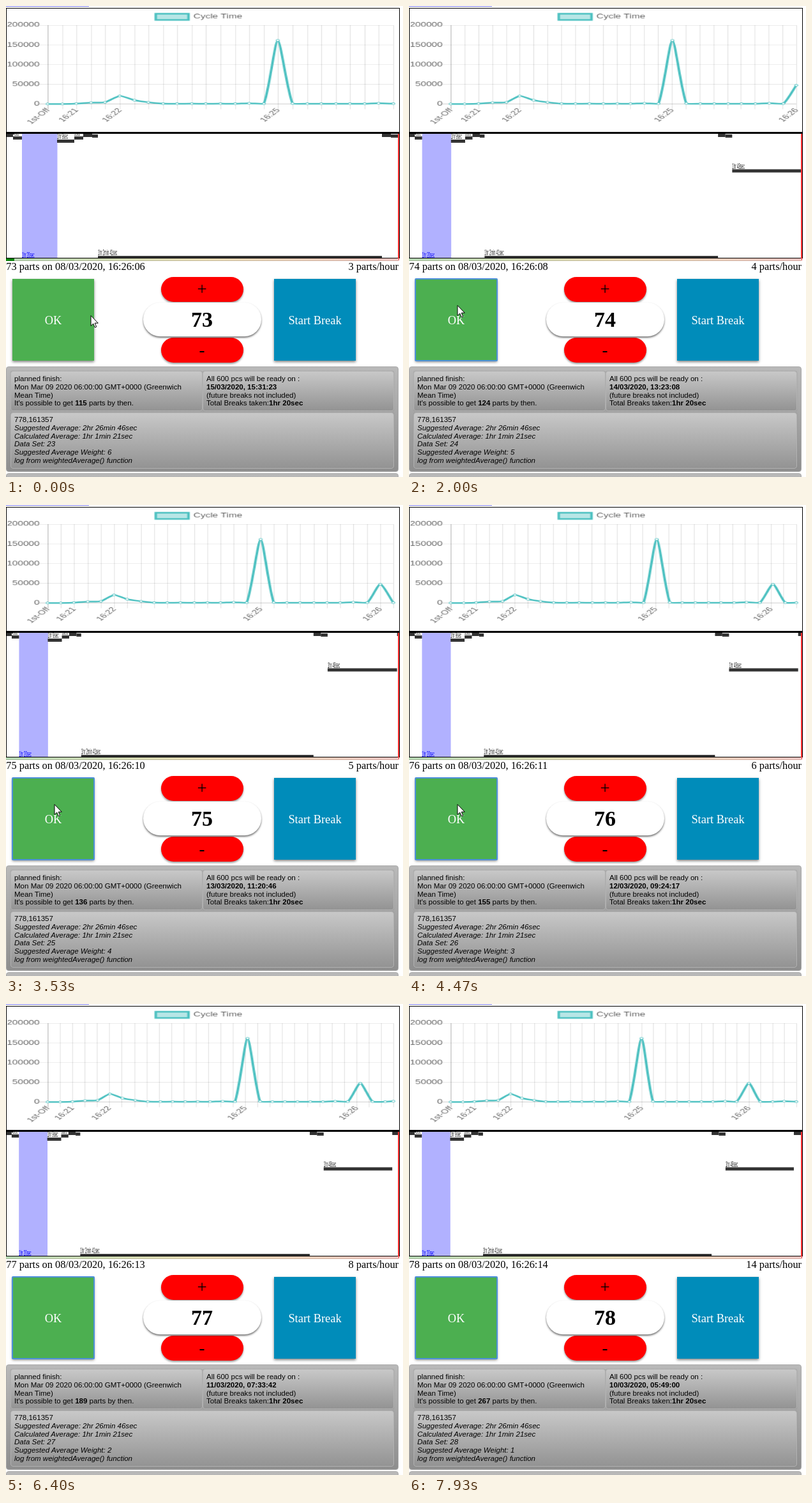
These frames come from a looping animation (622x737 px, 8000 ms). An HTML page with a canvas:

```html
<!DOCTYPE html>
<html lang="en">
<head>
<meta charset="utf-8">
<title>Cycle time</title>
<style>
  html, body { margin: 0; width: 622px; height: 737px; overflow: hidden; background: #fff; }
  body { position: relative; }
  div, canvas, svg { position: absolute; box-sizing: border-box; }
  svg { left: 0; top: 0; }
  #chart { left: 1px; top: 4px; width: 616px; height: 193.5px; }
  .frame { left: 0; width: 617px; border: 1px solid #000; }
  .tile { top: 427px; width: 128px; height: 128px; box-shadow: 0 2px 4px rgba(0,0,0,.5); }
  .pill { left: 243px; width: 128.5px; height: 39px; border-radius: 19.5px; background: #f00; box-shadow: 0 2px 3px rgba(0,0,0,.4); }
  .count { left: 215px; top: 463.5px; width: 185px; height: 53px; border-radius: 26.5px; background: #fff; box-shadow: 0 2px 3px rgba(0,0,0,.55); }
  .panel { left: 0; width: 614.5px; border-radius: 4px; background: linear-gradient(#b9b9b9, #8e8e8e); border: 1px solid #a9a9a9; }
  .card { border-radius: 4px; background: linear-gradient(#c8c8c8, #939393); border: 1.5px solid #b2b2b2; box-shadow: 0 0 1px #777; }
  .bar { left: 0; top: 395px; width: 615px; height: 4px; background: linear-gradient(90deg, #b5d8b3, #e8dcb4 50%, #f6c5c2); border-bottom: 1px solid rgba(120,110,90,.25); }
  #spent { left: 0; top: 395px; width: 13px; height: 4px; background: #0a820a; }
  #focus { left: 9px; top: 426px; width: 130px; height: 130px; border: 2px solid #4d90d9; border-radius: 2px; }
  #touch { left: 53px; top: 465px; width: 47px; height: 47px; border-radius: 50%; background: rgba(150,160,150,.22); }
  .serif { font-family: "Liberation Serif", "Times New Roman", serif; font-size: 16.35px; }
  .sans { font: 11.54px "Liberation Sans", Arial, sans-serif; }
  .tiny { font: 13px "Liberation Sans", Arial, sans-serif; }
  .label { font-size: 18.4px; fill: #fff; text-anchor: middle; }
  .sign { font-size: 27px; text-anchor: middle; }
  .big { font-size: 34px; font-weight: bold; text-anchor: middle; }
  .b { font-weight: bold; }
  .i { font-style: italic; }
</style>
</head>
<body>
<div style="left:0;top:0;width:130px;height:1px;background:#7a7ae8"></div>
<canvas id="chart" width="480" height="240"></canvas>
<svg id="timeline" width="622" height="400"></svg>
<div class="frame" style="top:3px;height:196px"></div>
<div class="frame" style="top:197px;height:198px;border-top-width:3px"></div>
<div style="left:614px;top:200px;width:2px;height:198px;background:#f33"></div>
<div class="bar"></div><div id="spent"></div>
<div class="tile" style="left:10px;background:#4caf50"></div>
<div id="focus"></div><div id="touch"></div>
<div class="tile" style="left:420px;background:#008cba"></div>
<div class="pill" style="top:424px"></div>
<div class="pill" style="top:519px"></div>
<div class="count"></div>
<div class="panel" style="top:564px;height:165px"></div>
<div class="panel" style="top:731px;height:165px"></div>
<div class="card" style="left:7px;top:570.5px;width:300.5px;height:63px"></div>
<div class="card" style="left:307.5px;top:570.5px;width:300px;height:63px"></div>
<div class="card" style="left:7px;top:635.5px;width:600.5px;height:88.5px"></div>
<svg width="622" height="737">
  <g class="serif">
    <text id="made" x="0.3" y="413"></text>
    <text id="rate" x="615" y="413" text-anchor="end"></text>
    <text class="label" x="74" y="497.5">OK</text>
    <text class="label" x="484" y="497.5">Start Break</text>
    <text class="sign" x="307" y="452">+</text>
    <text class="sign" x="307" y="547">-</text>
    <text class="big" id="count" x="307" y="502"></text>
  </g>
  <g class="sans" id="info"></g>
  <path id="cursor" d="M.5 .5V16.5L4.2 13L6.8 19L9.2 18L6.7 12.2H11.8Z" fill="#fff" stroke="#000"/>
</svg>
<script>
const LOOP = 8000;
const $ = id => document.getElementById(id);

// start, animation start, rate, reachable parts, finish time at clock second 0, timeline scale
const states = [
  [0, -2000, 3, 115, [15, 31, 17], 1],
  [1470, 1510, 4, 124, [13, 23, 0], .822],
  [2800, 2840, 5, 136, [11, 20, 36], .818],
  [4070, 4110, 6, 155, [9, 24, 6], .814],
  [6130, 6165, 8, 189, [7, 33, 29], .808],
  [7210, 7250, 14, 267, [5, 48, 46], .805]
];

const times = [
  200, 150, 1000, 3500, 4500, 20500, 9800, 4500, 900, 800, 900, 800, 900, 800, 1800,
  900, 161357, 1500, 700, 800, 700, 800, 700, 1900, 900, 47500, 900, 700, 2000, 900
];
const marks = { 0: '1st-Off', 2: '16:21', 5: '16:22', 16: '16:25', 25: '16:26' };

const area = { left: 50, right: 472, top: 32, bottom: 184.8 };
const TEAL = 'rgb(75,192,192)';
const TENSION = .2;
const ctx = $('chart').getContext('2d');
const yOf = v => area.bottom - v / 200000 * (area.bottom - area.top);
const xOf = (i, n) => area.left + Math.round((area.right - area.left) * Math.min(1, i / (n - 1)));
const clampY = y => Math.max(area.top, Math.min(area.bottom, y));
const pad = n => String(n).padStart(2, '0');

function rule(x1, y1, x2, y2, alpha) {
  ctx.strokeStyle = `rgba(0,0,0,${alpha})`;
  ctx.beginPath();
  ctx.moveTo(x1, y1);
  ctx.lineTo(x2, y2);
  ctx.stroke();
}

function drawAxes(n) {
  ctx.font = '12px "Liberation Sans", Arial, sans-serif';
  ctx.textBaseline = 'middle';
  ctx.lineWidth = 1;
  ctx.fillStyle = '#666';
  ctx.textAlign = 'right';
  for (let v = 0; v <= 200000; v += 50000) {
    const y = Math.round(yOf(v) - .5) + .5;
    rule(area.left - 10, y, area.right, y, v ? .1 : .25);
    ctx.fillText(v, 40.2, yOf(v));
  }
  for (let i = 0; i < n; i++) {
    const x = xOf(i, n) + .5;
    rule(x, area.top, x, area.bottom + 10, i ? .1 : .25);
    if (!marks[i]) continue;
    ctx.save();
    ctx.translate(x, area.bottom + 10);
    ctx.rotate(-50 * Math.PI / 180);
    ctx.fillText(marks[i], 0, 0);
    ctx.restore();
  }
  ctx.textAlign = 'left';
  ctx.fillText('Cycle Time', 228, 16);
  ctx.fillStyle = 'rgba(75,192,192,.4)';
  ctx.strokeStyle = TEAL;
  ctx.lineWidth = 3;
  ctx.fillRect(182, 10, 40, 12);
  ctx.strokeRect(182, 10, 40, 12);
}

// Bezier handles on both sides of a point
function handles(a, p, b) {
  const d1 = Math.hypot(p.x - a.x, p.y - a.y), d2 = Math.hypot(b.x - p.x, b.y - p.y);
  const sum = d1 + d2 || 1, f1 = TENSION * d1 / sum, f2 = TENSION * d2 / sum;
  const dx = b.x - a.x, dy = b.y - a.y;
  return {
    inX: p.x - f1 * dx, inY: clampY(p.y - f1 * dy),
    outX: p.x + f2 * dx, outY: clampY(p.y + f2 * dy)
  };
}

function drawChart(n, progress) {
  const ease = 1 - (1 - progress) ** 4;
  const mix = (a, b) => a + (b - a) * ease;
  const pts = times.slice(0, n).map((v, i) => ({ x: mix(xOf(i, n - 1), xOf(i, n)), y: yOf(v) }));
  const h = pts.map((p, i) => handles(pts[i - 1] || p, p, pts[i + 1] || p));
  ctx.clearRect(0, 0, 480, 240);
  drawAxes(n);
  ctx.strokeStyle = TEAL;
  ctx.lineWidth = 3;
  ctx.lineJoin = 'miter';
  ctx.beginPath();
  ctx.moveTo(pts[0].x, pts[0].y);
  for (let i = 1; i < n; i++) {
    ctx.bezierCurveTo(h[i - 1].outX, h[i - 1].outY, h[i].inX, h[i].inY, pts[i].x, pts[i].y);
  }
  ctx.stroke();
  ctx.lineWidth = 1;
  ctx.fillStyle = '#fff';
  for (const p of pts) {
    ctx.beginPath();
    ctx.arc(p.x, p.y, 2, 0, 7);
    ctx.fill();
    ctx.stroke();
  }
}

// from, to, top, label
const spans = [
  [0, 11, 200, '1sec'], [11, 25, 204, '4sec'], [80, 107, 209, '1hr 9sec'], [107, 121, 204, '5sec'],
  [121, 135, 200, ''], [135, 144, 201, ''], [144, 589, 391, '1hr 2min 41sec'],
  [589, 603, 200, ''], [603, 616, 201, ''], [616, 749, 255.5, '1hr 48sec'], [749, 800, 200, '']
];

function drawTimeline(k) {
  const tag = (x, y, text, fill) =>
    `<text class="tiny" transform="translate(${x} ${y}) scale(.34 1)" fill="${fill}">${text}</text>`;
  let out = `<clipPath id="clip"><rect x="0" y="199" width="616" height="196"/></clipPath><g clip-path="url(#clip)">
    <rect x="${25 * k}" y="199" width="${55.5 * k}" height="196" fill="#b1b1ff"/>` + tag(25 * k, 394, '1hr 20sec', '#00f');
  for (const [from, to, y, text] of spans) {
    if (from * k > 615) continue;
    out += `<rect x="${from * k}" y="${y}" width="${(to - from) * k}" height="5" fill="#333"/>`;
    if (text) out += tag(from * k, y - 1, text, '#222');
  }
  $('timeline').innerHTML = out + '</g>';
}

function drawInfo(n, possible, finish) {
  const block = (x, y, lines) => lines.map(([text, cls = ''], i) =>
    `<text x="${x}" y="${y + i * 12.75}" class="${cls}">${text}</text>`).join('');
  const bold = s => `<tspan class="b">${s}</tspan>`;
  $('info').innerHTML =
    block(13, 587, [
      ['planned finish:'], ['Mon Mar 09 2020 06:00:00 GMT+0000 (Greenwich'], ['Mean Time)'],
      [`It's possible to get ${bold(possible)} parts by then.`]
    ]) +
    block(314, 587, [
      ['All 600 pcs will be ready on :'], [finish, 'b'], ['(future breaks not included)'],
      [`Total Breaks taken:${bold('1hr 20sec')}`]
    ]) +
    block(13, 651, [
      ['778,161357'], ['Suggested Average: 2hr 26min 46sec', 'i'], ['Calculated Average: 1hr 1min 21sec', 'i'],
      [`Data Set: ${23 + n}`, 'i'], [`Suggested Average Weight: ${6 - n}`, 'i'], ['log from weightedAverage() function', 'i']
    ]);
}

let shown = '';
function drawPage(n, sec) {
  if (shown === n + ':' + sec) return;
  shown = n + ':' + sec;
  const [, , rate, possible, [hh, mm, ss], scale] = states[n];
  const end = hh * 3600 + mm * 60 + ss + sec;
  const clock = [end / 3600, end / 60 % 60, end % 60].map(v => pad(Math.floor(v))).join(':');
  $('made').textContent = `${73 + n} parts on 08/03/2020, 16:26:${pad(sec)}`;
  $('rate').textContent = `${rate} parts/hour`;
  $('count').textContent = 73 + n;
  $('spent').style.opacity = n ? 0 : 1;
  drawTimeline(scale);
  drawInfo(n, possible, `${15 - n}/03/2020, ${clock}`);
}

function render(t) {
  let n = states.length - 1;
  while (states[n][0] > t) n--;
  drawPage(n, 6 + Math.floor((t + 800) / 1000));
  drawChart(25 + n, Math.max(0, Math.min(1, (t - states[n][1]) / 1000)));
  $('focus').style.opacity = t < 1200 ? 0 : 1;
  $('cursor').setAttribute('transform', t < 200 ? 'translate(132.5 484)' : 'translate(75.5 468)');
  $('cursor').style.opacity = t < 6130 ? 1 : 0;
  $('touch').style.opacity = t < 7000 ? 0 : Math.max(0, Math.min(1, (t - 6950) / 150, (7600 - t) / 200));
}

const start = performance.now();
function loop() {
  render((performance.now() - start) % LOOP);
  requestAnimationFrame(loop);
}
loop();
</script>
</body>
</html>
```
